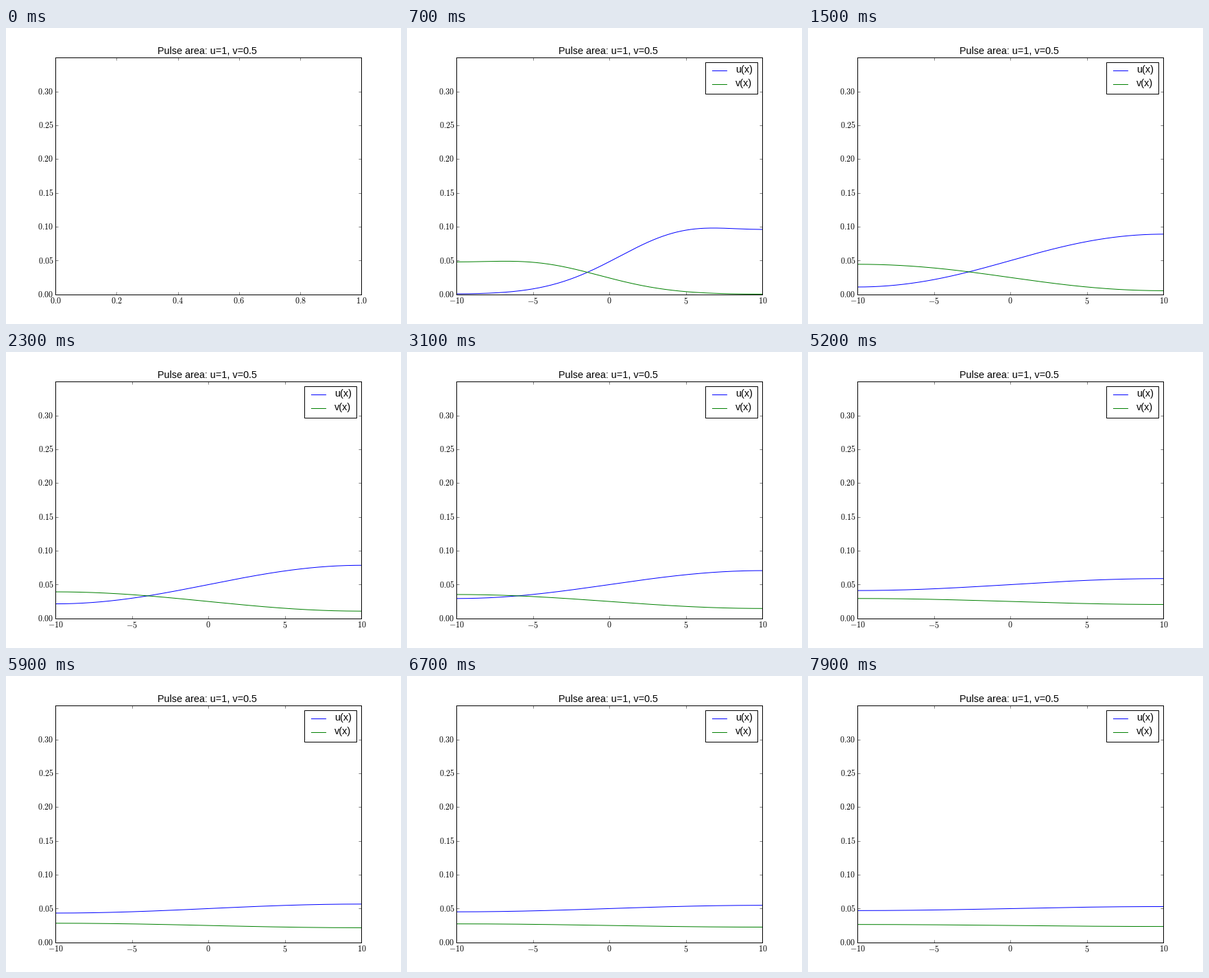
Write a matplotlib script that moves like this. It is 576 px wide and 432 px high and loops after 8000 ms.

```python
import numpy as np
import matplotlib.pyplot as plt
from matplotlib.animation import FuncAnimation
from matplotlib.lines import Line2D
from matplotlib.patches import Rectangle
from matplotlib.transforms import ScaledTranslation

W, H = 576, 432
FRAMES, INTERVAL = 80, 100
HALF = 10.0            # domain is [-HALF, HALF] with closed ends
SPREAD = 1.64          # diffusion per frame
START_VAR = 1.44       # variance of the first pulse
BLUE, GREEN = "#0000ff", "#008000"

plt.rcParams.update({
    "font.family": "Liberation Sans",
    "mathtext.fontset": "cm",
    "xtick.direction": "in", "ytick.direction": "in",
    "xtick.top": True, "ytick.right": True,
    "xtick.major.size": 4, "ytick.major.size": 4,
    "xtick.major.width": 0.5, "ytick.major.width": 0.5,
    "xtick.major.pad": 2.8, "ytick.major.pad": 2.8,
    "xtick.labelsize": 12, "ytick.labelsize": 12,
    "axes.linewidth": 1.0,
})

x = np.linspace(-HALF, HALF, 201)
wave = np.arange(1, 80) * np.pi / (2 * HALF)
modes = np.cos(np.outer(x + HALF, wave))


def pulse(area, center, step):
    """Gaussian pulse spreading between two reflecting walls."""
    decay = np.exp(-wave**2 * (START_VAR / 2 + SPREAD * step))
    coef = np.cos(wave * (center + HALF)) * decay
    return area / (2 * HALF) * (1 + 2 * modes @ coef)


fig = plt.figure(figsize=(W / 72, H / 72), dpi=72, facecolor="white")
ax = fig.add_axes([0.125, 0.1, 0.775, 0.8])
ax.set_title("Pulse area: u=1, v=0.5", fontsize=14.4, pad=5, x=0.497)
ax.set_ylim(0, 0.35)
y_ticks = np.arange(7) * 0.05
ax.set_yticks(y_ticks, [f"${t:.2f}$" for t in y_ticks])
lift = ScaledTranslation(0, 1 / 72, fig.dpi_scale_trans)
for label in ax.get_yticklabels():
    label.set_transform(label.get_transform() + lift)

u_line, = ax.plot([], [], color=BLUE, lw=1)
v_line, = ax.plot([], [], color=GREEN, lw=1)


def add_key():
    """Legend box placed in pixels from the top left corner."""
    box = Rectangle((435, H - 96), 76, 46, fc="white", ec="black", lw=1,
                    transform=None, zorder=5)
    parts = [ax.add_artist(box)]
    for name, color, y in (("u(x)", BLUE, 62), ("v(x)", GREEN, 82)):
        parts.append(ax.add_artist(Line2D([445, 466], [H - y, H - y], color=color,
                                          lw=1, transform=None, zorder=6)))
        parts.append(ax.text(479, H - y - 3.5, name, fontsize=14.4,
                             transform=None, zorder=6))
    return parts


key = add_key()


def set_x_axis(low, high, ticks, fmt):
    ax.set_xlim(low, high)
    ax.set_xticks(ticks, [f"${t:{fmt}}$" for t in ticks])


def draw(i):
    running = i > 0
    for part in (u_line, v_line, *key):
        part.set_visible(running)
    if running:
        set_x_axis(-HALF, HALF, range(-10, 11, 5), "d")
        u_line.set_data(x, pulse(1.0, 5, i - 1))
        v_line.set_data(x, pulse(0.5, -5, i - 1))
    else:
        set_x_axis(0, 1, np.arange(6) * 0.2, ".1f")
    return u_line, v_line


anim = FuncAnimation(fig, draw, frames=FRAMES, init_func=lambda: draw(0),
                     interval=INTERVAL, repeat=True, repeat_delay=0, blit=False)
plt.show()
```
